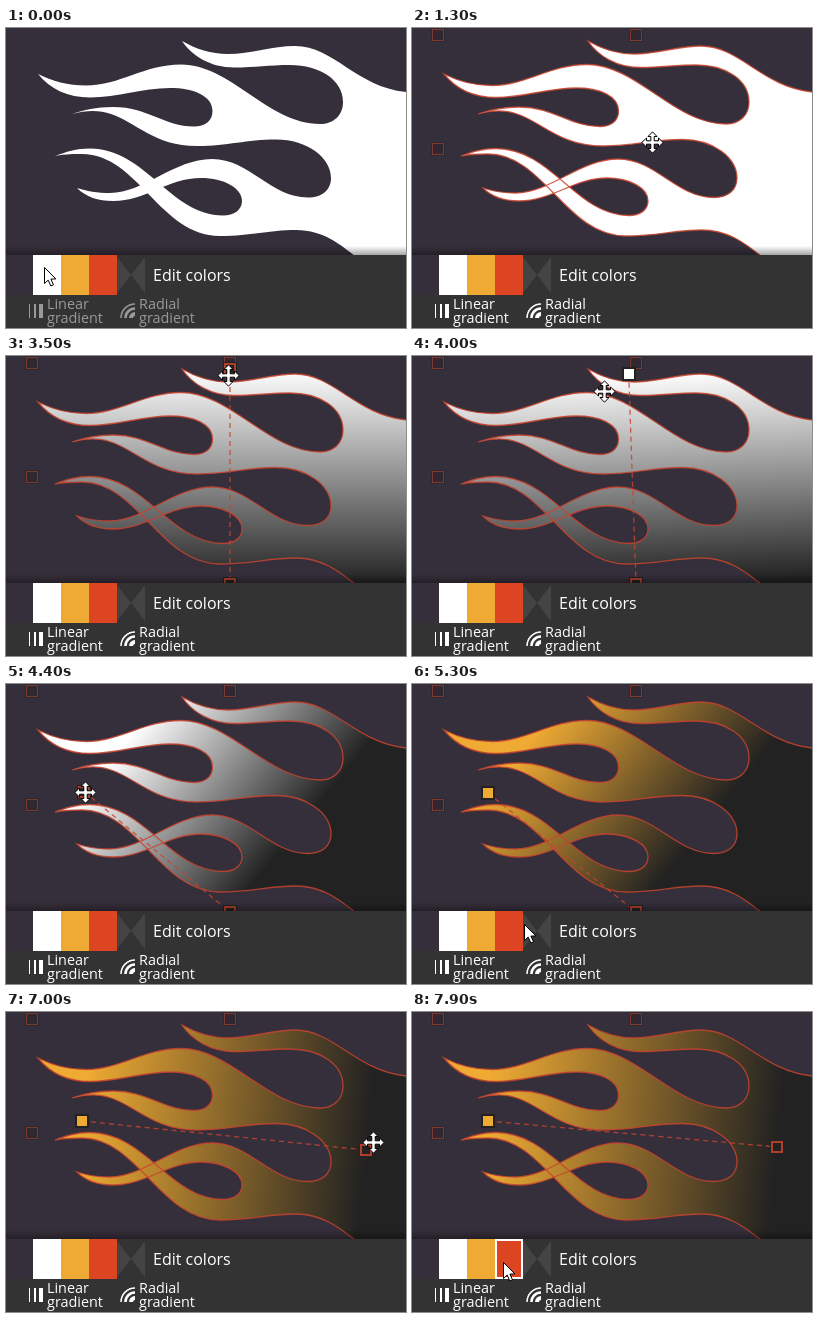
These frames come from a looping animation (400 by 300 pixels, 8000 ms). An HTML page with a canvas:

```html
<!DOCTYPE html>
<html lang="en">
<head>
<meta charset="utf-8">
<title>Gradient editing</title>
<style>
  html, body { margin: 0; width: 100%; height: 100%; overflow: hidden; background: #352f3b; }
  canvas { display: block; width: 400px; height: 300px; }
</style>
</head>
<body>
<canvas id="stage" width="400" height="300"></canvas>
<script>
const ctx = document.getElementById('stage').getContext('2d');
const LOOP = 8000, STEP = 100;
const BG = '#352f3b', DARK = '#222222', YELLOW = '#eeaa33', RED = '#dd4422';
const LINE = 'rgba(200,68,45,.85)';
const PANEL_Y = 227;
const SWATCHES = ['#ffffff', YELLOW, RED];

const flame = new Path2D(`M424 66 L400 64
  C350 59 328 18 289 18 C266 18 245 26 222 26 C205 26 190 21 176 13
  C186 28 205 39.5 228 39.5 C250 39.5 262 37 284 37
  C314 37 337 52 337 74 C337 88 327 96 314 96
  C262 96 225 36.5 175 36.5 C138 36.5 114 57.5 80 57.5 C62 57.5 46 53 32 46
  C44 61 62 69.5 84 69.5 C112 69.5 136 60 164 60
  C188 60 206.5 68 206.5 83 C206.5 93 199 98.5 188 98.5
  C158 98.5 142 79 107 79 C90 79 78 82 66 86
  C80 82 94 82 105 86 C130 94 148 118 191 118
  C222 118 240 111.5 270 111.5 C302 111.5 325 130 325 150
  C325 162 316 169.5 302 169.5 C264 169.5 244 131 206 131
  C168 131 138 165 104 165 C92 165 80 163 71 160
  C80 169 92 173 107 173 C140 173 162 150 195 150
  C218 150 236 160 236 173 C236 182 228 187.5 217 187.5
  C164 187.5 140 120.5 84 120.5 C70 120.5 60 124 49 128
  C60 126 68 126 76 126 C132 126 154 208 214 208
  C246 208 262 202 290 202 C318 202 336 218 349 228 L424 228 Z`);

// Pointer legs: start ms, end ms, target x, target y
const HOME = [38, 239];
const LEGS = [
  [250, 1000, 252, 102],
  [1000, 2200, 54, 288],
  [2500, 3700, 225, 14],
  [3750, 4400, 79, 108],
  [4600, 5000, 66, 246],
  [5050, 5650, 224, 224],
  [5790, 7180, 368, 129],
  [7180, 7880, 91, 250]
];
const SELECT_AT = 1200, LINEAR_AT = 2500, YELLOW_AT = 5100;
const DRAG_START = LEGS[3], DRAG_END = LEGS[6];

function ease(u) {
  u = Math.min(1, Math.max(0, u));
  return u < 0.5 ? 4 * u ** 3 : 1 - 4 * (1 - u) ** 3;
}
const progress = (t, leg) => ease((t - leg[0]) / (leg[1] - leg[0]));
const mix = (a, b, s) => [a[0] + (b[0] - a[0]) * s, a[1] + (b[1] - a[1]) * s];
const during = (t, leg) => t >= leg[0] && t <= leg[1];
const near = (a, b) => Math.hypot(a[0] - b[0], a[1] - b[1]) < 13;

function pointerAt(t) {
  return LEGS.reduce((p, leg) => mix(p, [leg[2], leg[3]], progress(t, leg)), HOME);
}

// Gradient handles trail the pointer by one step
function gradientAt(t) {
  return {
    from: mix([224, 13], [76, 109], progress(t - STEP, DRAG_START)),
    to: mix([224, 228], [365, 135], progress(t - STEP, DRAG_END)),
    color: t >= YELLOW_AT ? YELLOW : '#ffffff'
  };
}

function rect(color, x, y, w, h) {
  ctx.fillStyle = color;
  ctx.fillRect(x, y, w, h);
}

function square(x, y, size, color) {
  rect(color, Math.round(x - size / 2), Math.round(y - size / 2), size, size);
}

function polygon(points) {
  ctx.beginPath();
  points.forEach(([x, y]) => ctx.lineTo(x, y));
  ctx.closePath();
}

function text(str, x, y, size) {
  ctx.font = `500 ${size}px "Open Sans", "Noto Sans", sans-serif`;
  ctx.fillText(str, x, y);
}

function boxHandle(x, y) {
  square(x, y, 14, '#2d2730');
  square(x, y, 12, '#80392f');
  square(x, y, 10, '#2f2831');
}

function stopHandle([x, y], color, selected) {
  square(x, y, 14, DARK);
  if (selected) {
    square(x, y, 10, color);
  } else {
    square(x, y, 12, LINE);
    square(x, y, 8, DARK);
  }
}

function drawFlame(t, g, p) {
  if (t < LINEAR_AT) {
    ctx.fillStyle = '#ffffff';
  } else {
    const fill = ctx.createLinearGradient(...g.from, ...g.to);
    fill.addColorStop(0, g.color);
    fill.addColorStop(1, DARK);
    ctx.fillStyle = fill;
  }
  ctx.fill(flame);
  if (t < SELECT_AT) return;

  ctx.strokeStyle = LINE;
  ctx.lineWidth = 1.3;
  ctx.stroke(flame);
  boxHandle(26, 7);
  boxHandle(224, 7);
  boxHandle(26, 121);
  if (t < LINEAR_AT) return;

  ctx.setLineDash([5, 4]);
  ctx.beginPath();
  ctx.moveTo(...g.from);
  ctx.lineTo(...g.to);
  ctx.stroke();
  ctx.setLineDash([]);
  stopHandle(g.from, g.color, !near(p, g.from));
  stopHandle(g.to, DARK, false);
}

function drawPanel(t, [px, py]) {
  const shade = ctx.createLinearGradient(0, PANEL_Y - 9, 0, PANEL_Y);
  shade.addColorStop(0, 'rgba(0,0,0,0)');
  shade.addColorStop(1, 'rgba(0,0,0,.35)');
  rect(shade, 0, PANEL_Y - 9, 400, 9);
  rect('#333333', 0, PANEL_Y, 400, 73);
  rect(BG, 0, PANEL_Y, 27, 40);

  SWATCHES.forEach((color, i) => {
    const x = 27 + i * 28;
    rect(color, x, PANEL_Y, 28, 40);
    if (px >= x && px < x + 28 && py >= PANEL_Y && py < 267) {
      ctx.strokeStyle = '#ffffff';
      ctx.lineWidth = 2;
      ctx.strokeRect(x + 1, PANEL_Y + 1, 26, 38);
    }
  });

  ctx.fillStyle = '#444444';
  polygon([[111, 229], [125, 247], [111, 265]]);
  ctx.fill();
  polygon([[139, 229], [125, 247], [139, 265]]);
  ctx.fill();
  ctx.fillStyle = '#ffffff';
  text('Edit colors', 147, 253, 16);

  if (px >= 14 && px < 106 && py >= 267) rect('#444444', 14, 267, 92, 33);
  const ink = t < SELECT_AT ? '#999999' : '#ffffff';
  rect(ink, 23, 276, 1, 14);
  rect(ink, 28, 276, 2, 14);
  rect(ink, 33, 276, 4, 14);
  ctx.strokeStyle = ink;
  [[14, 1.5], [9.5, 2.6], [4, 4]].forEach(([r, w]) => {
    ctx.lineWidth = w;
    ctx.beginPath();
    ctx.arc(129, 290, r, Math.PI, Math.PI * 1.5);
    ctx.stroke();
  });
  ctx.fillStyle = ink;
  text('Linear', 41, 281, 14.4);
  text('gradient', 41, 295, 14.4);
  text('Radial', 133, 281, 14.4);
  text('gradient', 133, 295, 14.4);
}

const ARROW = [[0, 0], [0, 16], [3.7, 12.6], [6.3, 18.5], [9, 17.3], [6.4, 11.6], [11.4, 11.4]];
const ARM = [[-1.7, -1.7], [-1.7, -6], [-4.5, -6], [0, -10.7], [4.5, -6], [1.7, -6]];
const MOVE = [0, 1, 2, 3].flatMap(i => {
  const c = [1, 0, -1, 0][i], s = [0, 1, 0, -1][i];
  return ARM.map(([x, y]) => [x * c - y * s, x * s + y * c]);
});

function isMoving(t, p, g) {
  if (during(t, DRAG_START) || during(t, DRAG_END)) return true;
  if (t < LINEAR_AT) return p[1] < PANEL_Y;
  return near(p, g.from) || near(p, g.to);
}

function drawPointer(p, moving) {
  ctx.save();
  ctx.translate(Math.round(p[0]) + 0.5, Math.round(p[1]) + 0.5);
  polygon(moving ? MOVE : ARROW);
  ctx.fillStyle = '#ffffff';
  ctx.strokeStyle = '#000000';
  ctx.lineWidth = 1;
  ctx.lineJoin = 'round';
  ctx.fill();
  ctx.stroke();
  ctx.restore();
}

function draw() {
  const t = Math.floor(performance.now() % LOOP / STEP) * STEP;
  const p = pointerAt(t), g = gradientAt(t);
  rect(BG, 0, 0, 400, 300);
  drawFlame(t, g, p);
  drawPanel(t, p);
  drawPointer(p, isMoving(t, p, g));
  requestAnimationFrame(draw);
}
draw();
</script>
</body>
</html>
```
